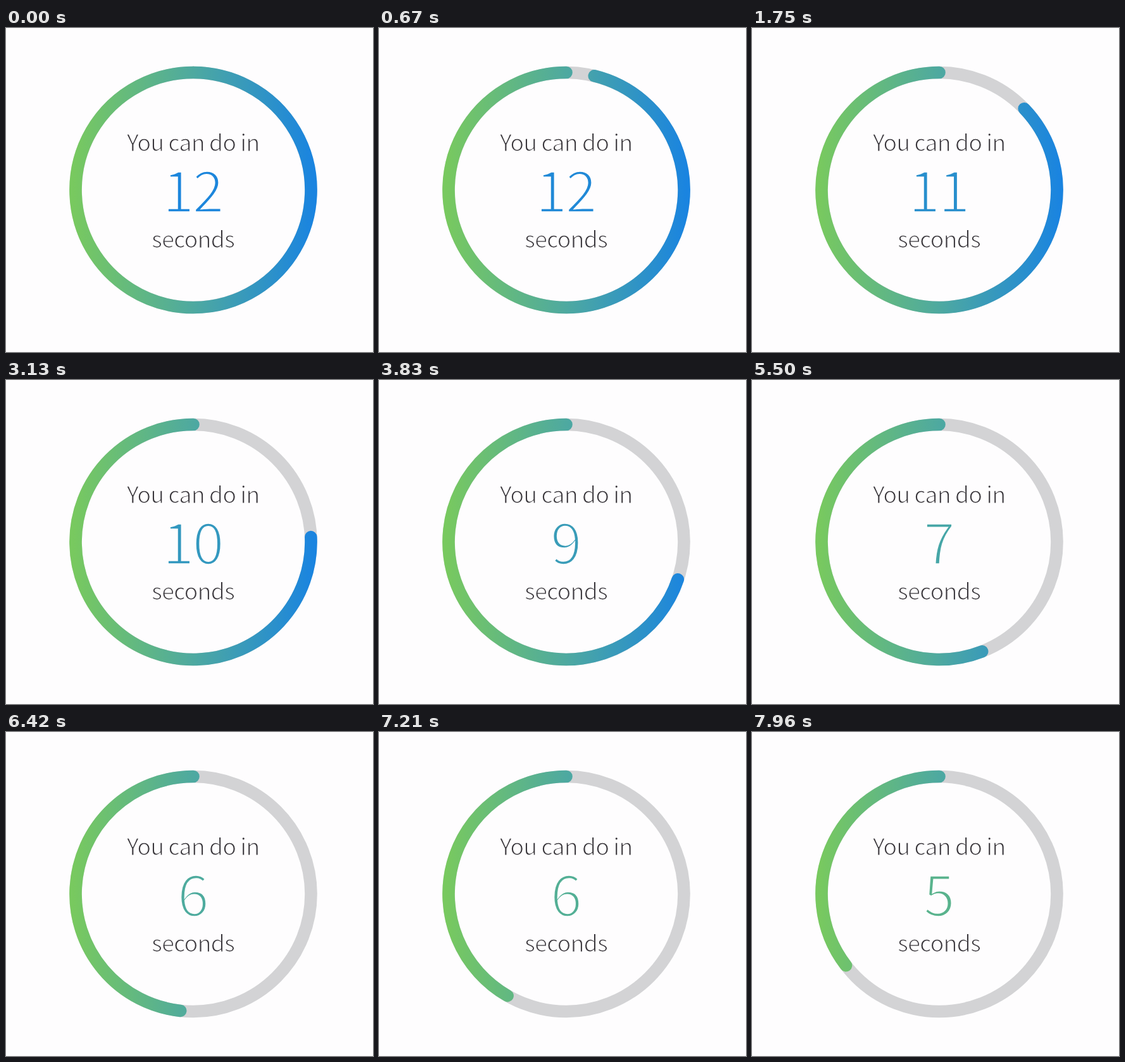
An HTML page that plays this animation: 580x513 px, repeating every 8 s.

```html
<!DOCTYPE html>
<html lang="en">
<head>
<meta charset="utf-8">
<title>Countdown ring</title>
<style>
  html, body { margin: 0; width: 100%; height: 100%; overflow: hidden; background: #fefdfe; }
  svg { display: block; width: 580px; height: 513px; }
  /* The background-coloured outline thins the regular weight to a light one. */
  text {
    font: 300 36.2px "Noto Sans CJK SC", "Noto Sans CJK JP", "Noto Sans", sans-serif;
    letter-spacing: -1px;
    text-anchor: middle;
    fill: #39363b;
    stroke: #fefdfe;
    stroke-width: 1.25px;
  }
  #count { font-size: 90.6px; letter-spacing: -3px; stroke-width: 3.4px; }
  circle, path { fill: none; stroke-width: 19.6; }
  path { stroke: url(#blend); stroke-linecap: round; }
</style>
</head>
<body>
<svg viewBox="0 0 580 513">
  <defs>
    <linearGradient id="blend" gradientUnits="userSpaceOnUse" x1="106" y1="0" x2="486" y2="0">
      <stop offset="0" stop-color="#78c95f"/>
      <stop offset=".5" stop-color="#4ea9a0"/>
      <stop offset="1" stop-color="#1a84e0"/>
    </linearGradient>
  </defs>
  <circle cx="296" cy="256.5" r="186" stroke="#d3d3d5"/>
  <path id="arc"/>
  <text x="295.5" y="195">You can do in</text>
  <text id="count" x="294.5" y="291.7"></text>
  <text x="295.5" y="348">seconds</text>
</svg>
<script>
  const LOOP = 8000, TOTAL = 12000, DELAY = 212;
  const CX = 296, CY = 256.5, R = 186;
  const BLUE = [28, 134, 220], TEAL = [76, 170, 160], GREEN = [120, 201, 95];
  const arc = document.getElementById("arc");
  const count = document.getElementById("count");

  const mix = (a, b, k) => `rgb(${a.map((v, i) => Math.round(v + (b[i] - v) * k))})`;
  const colorAt = p => p < .5 ? mix(BLUE, TEAL, p * 2) : mix(TEAL, GREEN, p * 2 - 1);

  function draw(time) {
    const elapsed = Math.max(0, time % LOOP - DELAY);
    const progress = elapsed / TOTAL;
    const angle = Math.max(progress * 2 * Math.PI, 1e-3);
    const x = CX + R * Math.sin(angle);
    const y = CY - R * Math.cos(angle);
    const large = angle < Math.PI ? 1 : 0;
    arc.setAttribute("d", `M${x} ${y}A${R} ${R} 0 ${large} 1 ${CX} ${CY - R}`);
    count.textContent = Math.ceil((TOTAL - elapsed) / 1000);
    count.style.fill = colorAt(progress);
  }

  const start = performance.now();
  function tick() {
    draw(performance.now() - start);
    requestAnimationFrame(tick);
  }
  tick();
</script>
</body>
</html>
```
